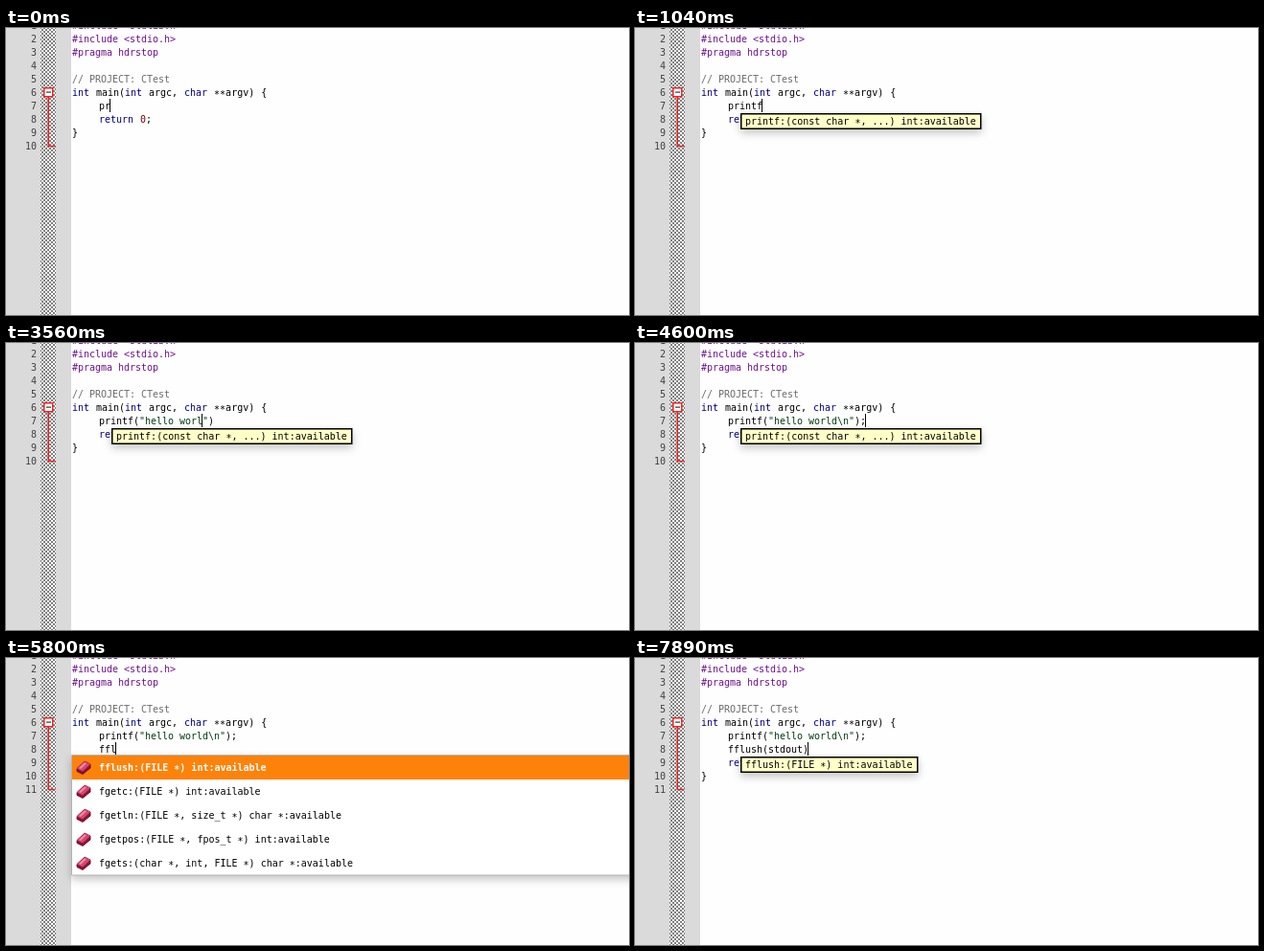
An HTML page that plays this animation: 650 by 300 pixels, repeating every 8 s.

```html
<!DOCTYPE html>
<html lang="en">
<head>
<meta charset="utf-8">
<title>Code completion</title>
<style>
  html, body { margin: 0; width: 650px; height: 300px; overflow: hidden; background: #fefefe; }
  svg { display: block; }
  text { font: 10px "DejaVu Sans Mono", monospace; white-space: pre; }
  .code { letter-spacing: -.0205px; word-spacing: 1px; }
  .pre { fill: #6f0f8f; word-spacing: 0; }
  .rem { fill: #6c6c6c; word-spacing: 0; }
  .str { fill: #003c10; word-spacing: 0; }
  .key { fill: #00007f; }
  .num { fill: #7f0000; }
  .line-no { fill: #404040; text-anchor: end; }
  .picked { fill: #fff; font-weight: bold; }
  .popup { filter: drop-shadow(0 4px 4px rgba(0, 0, 0, .22)); }
</style>
</head>
<body>
<svg width="650" height="300" viewBox="0 0 650 300">
  <defs>
    <pattern id="check" x="1" y="1" width="4" height="4" patternUnits="userSpaceOnUse">
      <path fill="#fff" d="M0 0h4v4h-4z"/>
      <path fill="#808080" d="M0 0h2v2h-2zM2 2h2v2h-2z"/>
    </pattern>
    <g id="brick" stroke-linejoin="round">
      <path d="M-7 1L1-6.5 7-3.5V.5L-1 7-7 4z" fill="#8c1238" stroke="#5e0a25" stroke-width=".8"/>
      <path d="M-7 1L1-6.5 7-3.5-1 4z" fill="#d8446c"/>
      <path d="M-5 .6L1-5.2 3-4.2-3 1.6z" fill="#ec8ba5"/>
    </g>
  </defs>
  <path fill="#dadada" d="M0 0h68v300H0z"/>
  <path fill="url(#check)" d="M36 0h16v300H36z"/>
  <g id="view"></g>
</svg>
<script>
(() => {
  const LOOP = 8000, LEFT = 69, INDENT = 97, CELL = 6;
  const NEWLINE = 4750;

  // [time, typed text, text kept right of the caret when it changes]
  const spell = (word, start, step) => [...word].map((c, i) => [start + i * step, c]);
  const printLine = [
    [0, 'pr'], [150, 'i'], [1040, 'ntf'], [1490, '(', ')'], [1640, '"', '")'],
    ...spell('hello w', 2240, 146.5), [3270, 'or'], [3420, 'l'], [3570, 'd'],
    [3710, '\\'], [4000, 'n'], [4150, '"', ')'], [4300, ')', ''], [4600, ';']
  ];
  const flushLine = [
    ...spell('ffl', 5050, 150), [6240, 'ush'], [6690, '(', ')'],
    ...spell('stdout', 6990, 150), [7890, ')', '']
  ];
  const printList = [
    'printf:(const char *, ...)', 'putc:(int, FILE *)', 'putchar:(int)',
    'putenv:(char *)', 'puts:(const char *)'
  ].map(s => s + ' int:available');
  const flushList = [
    'fflush:(FILE *) int', 'fgetc:(FILE *) int', 'fgetln:(FILE *, size_t *) char *',
    'fgetpos:(FILE *, fpos_t *) int', 'fgets:(char *, int, FILE *) char *'
  ].map(s => s + ':available');

  const lineTop = n => 14 * n - 24;
  const base = n => lineTop(n) + 11;
  const within = (t, a, b) => t >= a && t < b;
  const safe = s => s.replace(/&/g, '&amp;').replace(/</g, '&lt;');
  // Asterisks sit at mid height.
  const lower = s => s.replace(/(\*+)(.?)/g, '<tspan dy="1.7">$1</tspan><tspan dy="-1.7">$2</tspan>');
  const span = (cls, s) => `<tspan class="${cls}">${safe(s)}</tspan>`;
  const label = (x, y, body, cls = '') => `<text x="${x}" y="${y}" class="${cls}">${body}</text>`;
  const code = (n, body, x = LEFT) => label(x, base(n), body, 'code');

  function typed(keys, t) {
    let left = '', right = '';
    for (const [at, add, rest] of keys) {
      if (t < at) break;
      left += add;
      if (rest !== undefined) right = rest;
    }
    return { left, right };
  }

  function editLine(n, { left, right }) {
    const body = safe(left + right).replace(/"(\\.|[^"\\])*"?/g, s => `<tspan class="str">${s}</tspan>`);
    return code(n, body, INDENT);
  }

  const caret = (n, { left }) =>
    `<path d="M${INDENT + left.length * CELL - 1} ${lineTop(n)}h1v14h-1z"/>`;

  function fold(last, color) {
    const end = lineTop(last) + 7.5;
    return `<g fill="none" stroke="${color}" stroke-width="1.5">
      <path d="M44.25 72V${end}H51.5"/><path fill="#fff" d="M39.75 62.75h9v9h-9z"/></g>
      <path d="M42 66.5h5v1.2h-5z" fill="#333"/>`;
  }

  function tip(n, s) {
    const y = lineTop(n + 1) + 1.5, w = Math.round(s.length * 6.02) + 9;
    return `<g class="popup"><path d="M110.75 ${y + .25}h${w}v15.5h-${w}z" fill="#ffffc8"
      stroke="#000" stroke-width="1.5"/></g>` + label(115, y + 11.5, lower(s));
  }

  function list(n, items) {
    const y = lineTop(n + 1);
    const rows = items.map((s, i) => {
      const mid = y + 12.5 + 25 * i;
      return `<use href="#brick" x="81" y="${mid}"/>` + label(97, mid + 3.5, lower(s), i ? '' : 'picked');
    });
    return `<g class="popup"><path d="M68.5 ${y - .5}h600v125.5h-600z" fill="#fff" stroke="#b4b4b4"/></g>
      <path d="M69 ${y}h581v25H69z" fill="#fd820a"/>` + rows.join('');
  }

  function draw(t) {
    const added = t >= NEWLINE, shift = added ? 1 : 0, last = 10 + shift;
    const first = typed(printLine, t), second = typed(flushLine, t);
    const out = [
      code(1, span('pre', '#include <stdlib.h>')),
      code(2, span('pre', '#include <stdio.h>')),
      code(3, span('pre', '#pragma hdrstop')),
      code(5, span('rem', '// PROJECT: CTest')),
      code(6, `${span('key', 'int')} main(${span('key', 'int')} argc, ${span('key', 'char')} ${lower('**argv) {')}`),
      editLine(7, first),
      code(8 + shift, `${span('key', 'return')} ${span('num', '0')};`, INDENT),
      code(9 + shift, '}'),
      fold(last, within(t, 3710, 4000) ? '#808080' : '#f02020')
    ];
    for (let n = 1; n <= last; n++) out.push(label(32, base(n), n, 'line-no'));
    if (added) out.push(editLine(8, second));
    if (!within(t, 600, 1040) && !within(t, 5950, 6390))
      out.push(added ? caret(8, second) : caret(7, first));
    if (within(t, 450, 1040)) out.push(list(7, printList));
    if (within(t, 1040, NEWLINE)) out.push(tip(7, printList[0]));
    if (within(t, 5800, 6240)) out.push(list(8, flushList));
    if (t >= 6240) out.push(tip(8, flushList[0]));
    return out.join('');
  }

  const view = document.getElementById('view');
  let shown = '';
  function tick() {
    const next = draw(performance.now() % LOOP);
    if (next !== shown) view.innerHTML = shown = next;
    requestAnimationFrame(tick);
  }
  tick();
})();
</script>
</body>
</html>
```
